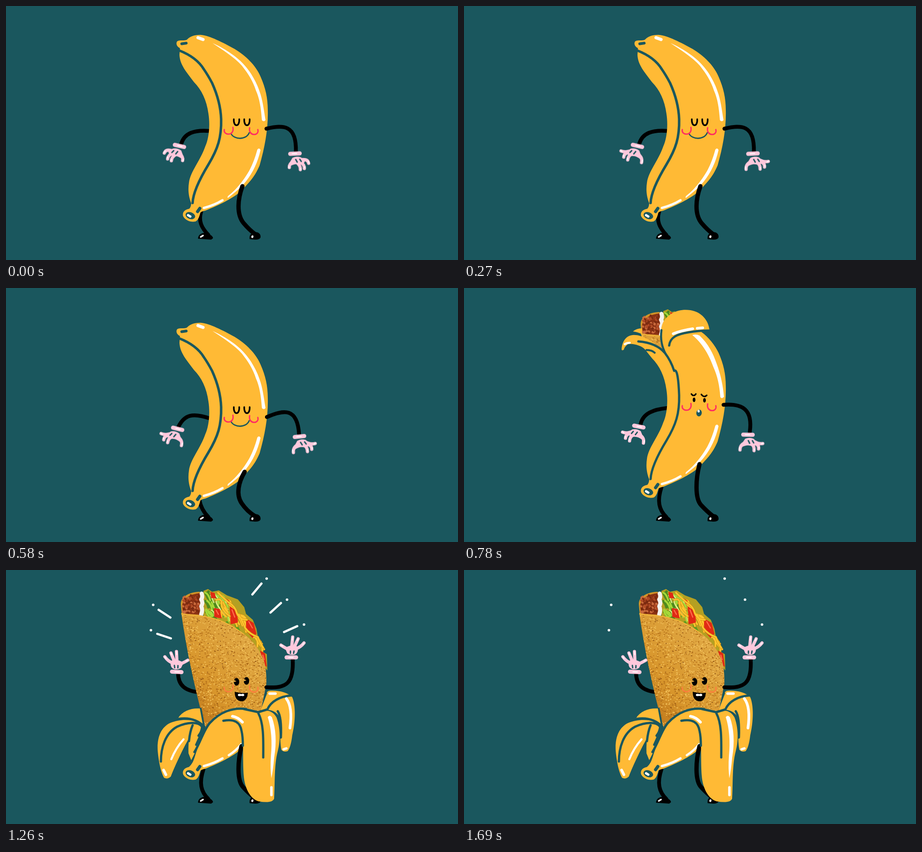
An HTML page for the animation above (1720 ms loop, 998 by 561 pixels).

```html
<!DOCTYPE html>
<html lang="en">
<head>
<meta charset="utf-8">
<title>Banana surprise</title>
<style>
  html, body { margin: 0; width: 100%; height: 100%; overflow: hidden; background: #1a575e; }
  svg { display: block; width: 100%; height: 100%; }
  svg path { stroke-linecap: round; stroke-linejoin: round; }
</style>
</head>
<body>
<svg id="stage" viewBox="0 0 998 561"></svg>
<script>
const LOOP = 1720;
const BG = '#1a575e', PEEL = '#ffba35', PINK = '#ffc8dc', RED = '#ff2d62', INK = '#000', WHITE = '#fff';

const fill = (d, c) => `<path d="${d}" fill="${c}"/>`;
const line = (d, w, c = INK) => `<path d="${d}" fill="none" stroke="${c}" stroke-width="${w}"/>`;
const oval = (x, y, rx, ry, c, r = 0) =>
  `<ellipse rx="${rx}" ry="${ry}" fill="${c}" transform="translate(${x} ${y}) rotate(${r})"/>`;
const group = (t, s) => `<g transform="${t}">${s}</g>`;
const use = (id, t = '') => `<use href="#${id}" transform="${t}"/>`;

let seed = 7;
const rnd = () => (seed = seed * 16807 % 2147483647) / 2147483647;
const many = (n, fn) => Array.from({ length: n }, (_, i) => fn(i / n)).join('');
const dots = (n, x, y, w, h) => many(n, () =>
  `M${(x + rnd() * w).toFixed(1)} ${(y + rnd() * h).toFixed(1)}h${(rnd() * 2).toFixed(1)}`);

// Hands: origin at the cuff, right-hand side; flip = -1 mirrors
const FINGERS = {
  curl: ['M-5 18Q-14 21 -14 30', 'M5 22Q11 28 10 36', 'M12 20Q20 26 19 34', 'M14 14Q28 13 29 23'],
  spread: ['M-6 18Q-17 22 -17 34', 'M9 21Q15 26 14 35', 'M14 18Q25 21 24 31', 'M12 14C22 19 24 20 33 19'],
  up: ['M-8 -18Q-17 -23 -23 -27', 'M1 -25L3 -45', 'M7 -24L15 -41', 'M10 -19Q20 -22 28 -32']
};
const TIPS = {
  curl: 'M-15 27v4M11 33v3M20 30v3M28 18l2 5',
  spread: 'M-18 28v6M15 31v4M25 27v3M30 20l4 -2',
  up: 'M-19 -25l-4 -2M2 -38l1 -7M13 -37l2 -4M25 -28l3 -4'
};
function hand([x, y, r], flip, kind) {
  const up = kind === 'up';
  const palm = up
    ? 'M-14 -21C-8 -25 8 -30 14 -23C16 -15 13 -8 7 -6Q-2 -4 -9 -9Z'
    : 'M-6 9Q4 5 13 9L21 18Q18 26 9 25Q-1 21 -12 27L-14 21Z';
  const marks = up ? 'M-2 -14v5M6 -14l-1 5' : 'M1 13l3 6M10 13l3 5';
  return group(`translate(${x} ${y}) rotate(${r}) scale(${flip} 1)`,
    fill(palm, PINK) + FINGERS[kind].map(d => line(d, 7, PINK)).join('') +
    line(marks, 3, BG) + line(TIPS[kind], 2, WHITE) +
    line('M-10.5 0H10.5', 9, PINK) + line('M-6 0H4', 2, WHITE));
}

// Limb poses
const POSE = {
  mid: {
    dy: 0,
    left: 'M450 276C415 273 394 281 387 304', lh: [383, 309, 13],
    right: 'M575 271C612 262 642 262 640 322', rh: [638, 326, -3],
    front: 'M522 398C512 425 508 460 525 480Q537 494 550 504', back: 'M431 454C424 475 432 490 447 506'
  },
  down: {
    dy: 13,
    left: 'M450 288C412 275 394 280 381 306', lh: [379, 311, 14],
    right: 'M576 285C615 268 643 265 647 322', rh: [648, 328, -6],
    front: 'M527 406C514 428 507 455 520 475Q532 493 550 504', back: 'M427 468C430 485 438 497 447 506'
  },
  up: {
    dy: -13,
    left: 'M449 265C420 268 395 276 390 301', lh: [386, 306, 11],
    right: 'M573 258C615 255 638 268 631 318', rh: [627, 324, 1],
    front: 'M520 389C512 420 509 465 524 480Q537 494 550 504', back: 'M436 440C426 470 430 490 447 506'
  }
};
const frontLeg = p => line(p.front, 9.5) +
  fill('M538 515C536 505 542 502 549 500C557 498 563 504 562 511Q561 516 550 516Z', INK) + oval(544, 509.5, 2.3, 3, WHITE, 10);
const backLeg = p => line(p.back, 8.5) +
  fill('M424 514C424 504 434 499 442 502Q457 506 457 513L453 516Z', INK) + line('M430 510L435 507', 3.5, WHITE);

// Faces, in resting coordinates
const cheeks = (c, w) => line('M482 273C479 286 505 288 501 268M538 269C534 288 560 288 556 273', w, c);
const FACE = {
  happy: line('M497 282C503 295 530 297 537 280', 2.8, BG) + cheeks(RED, 3) +
    line('M503 250C502 268 516 268 515 250M526 250C525 268 539 268 538 250', 3.5),
  angry: cheeks(RED, 3) + line('M502 247Q507 254 512 247M524 248Q530 256 536 250', 3.2) +
    oval(508, 260, 3, 5, INK) + oval(531, 261, 3, 5, INK) +
    oval(519, 289, 6, 7.5, BG, 10) + oval(518, 285, 2.5, 3, WHITE),
  grin: group('translate(0 -1)', cheeks('#ff7d3e', 2.5)) +
    oval(509, 260, 6, 8.5, INK) + oval(531, 258, 6, 8.5, INK) +
    fill('M509 259l-7 -4v6ZM531 257l-7 -4v6Z', '#dfa441') +
    fill('M505 282Q520 286 534 284C533 297 527 304 519 303C510 302 505 295 505 282Z', INK) +
    line('M514.5 289h2.5M521.5 289h2', 5, WHITE)
};

const STEM = 'C500 425 470 440 440 452Q430 454 429 457C427 465 424 474 418 476C408 478 396 474 391 464C389 456 394 450 404 448';
const stem = line('M423 454L428 447', 7, BG) + oval(407, 463, 11, 7.5, BG, 20) +
  line('M402 462L407 465', 5, WHITE) + line('M437 446Q460 440 478 429', 5, WHITE);
const shine = fill('M555 317Q559 312 562 318C556 345 545 368 530 387C520 400 505 412 490 424Q488 422 491 419C510 405 528 380 538 362Q548 343 555 317Z', WHITE);

const SIDE = 'C573 181 578 203 578 230C579 270 572 310 560 352C548 380 535 392 515 412' + STEM;
const LEFT = 'Q408 446 409 436C402 418 402 403 404 390C407 366 430 340 440 310C448 293 451 263 447 238C443 208 432 185 415 168';
const seam = ' 190 474 220 475 250C476 290 468 315 447 350C430 378 413 410 412 435';

const closed = fill('M378 78C384 74 394 78 400 74C406 67 418 63 432 64C450 66 478 80 505 95C530 110 552 132 562 156' +
  SIDE + LEFT + 'C398 145 384 130 383 108L384 93C376 89 375 82 378 78Z', PEEL) +
  line('M382 98C405 107 425 120 437 140Q446 153 455 170C464' + seam, 5.5, BG) +
  line('M388 83.5L398 82', 6, BG) + line('M424 70L435 74', 7, WHITE) +
  fill('M456 82C480 92 510 112 524 128C545 150 557 178 562 195C568 215 570 235 573 252Q569 257 565 252C563 225 560 205 552 187C545 165 535 150 521 132C505 114 480 98 456 82Z', WHITE) +
  shine + stem;

// The half-open shape is drawn in resting coordinates too
const halfOpen = fill('M373 109Q381 102 393 102V115Q383 110 373 109Z', PEEL) +
  fill('M348 149C349 133 356 119 372 117C390 115 415 128 443 153C436 133 430 108 440 88C452 68 475 58 500 62C525 66 540 85 542 106Q532 108 524 110C540 121 555 141 562 156' +
  SIDE + LEFT + 'L399 148C392 141 375 135 362 137Q354 143 353 149Q349 152 348 149Z', PEEL) +
  line('M385 131Q425 134 444 157Q457 174 464 196C471' + seam, 5, BG) +
  line('M436 106Q432 135 446 160M403 150Q415 150 421 156', 4.5, BG) +
  line('M453 140C455 122 470 115 495 111Q518 107 541 107', 5, BG) +
  line('M355 137Q360 134 366 134', 4.5, WHITE) +
  line('M462 114Q480 107 505 103M515 102L527 101', 6, WHITE) +
  fill('M504 117Q512 114 520 118C540 137 550 158 557 178C567 204 572 230 574 253Q570 259 566 254C564 228 560 208 550 186C542 163 526 134 504 117Z', WHITE) +
  shine + stem;

// Filled shell
const SHELL = 'M386 76L387 95C405 99 430 99 445 103C478 110 500 122 525 141C548 158 560 178 568 196C574 212 575 230 575 250L560 325L440 348Q403 210 387 95Z';
const crumbs = many(75, () =>
  oval((391 + rnd() * 36).toFixed(1), (56 + rnd() * 39).toFixed(1), 3, 2.2, ['#c96a3c', '#b04a24', '#7a2a10'][rnd() * 3 | 0], 40));
// Curls scattered along the arc of the filling, from u = a to b
const curls = (n, a, b) => many(n, i => {
  const u = a + (b - a) * i, x = 440 + u * 125, y = 48 + u * u * 115 + rnd() * 50 * (1 - u * .8);
  return `M${x | 0} ${y | 0}q${rnd() * 16 - 4 | 0} ${rnd() * 8 | 0} ${4 + rnd() * 10 | 0} ${8 + rnd() * 14 | 0}`;
});
const cheese = d => line(d, 5, '#c88a12') + line(d, 3.4, '#ffc62e');
const taco = fill('M436 46L446 42L455 48L470 45L488 56L512 65L526 82L530 97L545 110L553 130L558 158L567 165L566 180L576 186L577 222L560 200L522 142L508 132L488 136L480 118L436 104Z', '#b4a022') +
  line(curls(26, 0, .3), 6, '#4f8a1c') + line(curls(30, 0, .5), 4, '#a6d838') +
  line('M488 116l4 16M508 122l6 12', 6, '#5c9a20') + line(curls(16, .1, .4), 2.5, '#e2f08a') +
  cheese(curls(34, .25, 1)) +
  fill('M451 48l10 3l3 12l-11 -1ZM459 84l13 2l4 21l-16 -3ZM494 80l17 12l1 24l-16 4ZM480 60l14 8l-4 8ZM530 107l17 10l6 24l-9 9l-14 -16ZM561 178l11 6l4 30l-8 -5Z', '#e02a14') +
  line('M536 114l8 14M499 88l6 16M464 89l5 9M567 188l3 10', 2.5, '#ff6c4b') +
  cheese('M464 66q14 -6 12 14q4 12 18 22M468 50q14 14 24 22q14 8 18 24q6 14 22 14M514 98q10 20 14 30q10 14 28 20q4 12 12 24') +
  fill('M386 76C385 60 402 49 428 48L432 102L388 98Z', '#d19428') +
  fill('M389 80C389 65 404 53 429 51L430 99L391 96Z', '#8a3113') + crumbs +
  line('M432 52q3 8 -1 13q5 8 0 15q4 8 0 18', 9, '#f6f3ee') +
  fill(SHELL, 'url(#crust)') +
  '<g clip-path="url(#shell)">' + line(dots(1100, 386, 95, 192, 255), 1.9, '#b8741c') +
  line(dots(900, 386, 95, 192, 255), 1.8, '#f3c25c') + line(dots(170, 400, 105, 176, 240), 1.6, '#84480f') + '</g>' +
  line('M388 97C405 101 430 100 445 104C478 111 500 123 525 142', 2.5, '#f0b23a');

// Peeled skin
const leftPeel = fill('M380 327C390 311 410 304 430 306L438 345Q410 322 380 327Z', PEEL) +
  line('M430 306L437 344', 4, BG) +
  fill('M412 340C404 362 402 385 403 405L409 420L420 398L438 346L420 335Z', PEEL) +
  fill('M438 345C420 328 385 328 362 338C342 348 333 370 335 400C338 430 343 448 349 459Q357 463 364 456C370 440 390 395 405 370L416 340Z', PEEL) +
  line('M342 423C342 392 352 360 378 346C400 336 424 334 433 346Q432 358 425 366M412 343Q406 357 404 378M380 329Q415 323 438 346L420 386', 5, BG) +
  line('M392 374Q375 393 365 418', 4.5, WHITE) + line('M348 442L353 452', 6, WHITE);
const rightPeel = fill('M558 312C565 290 570 272 580 267C600 265 622 270 632 281C640 300 639 335 632 365Q629 391 622 400Q613 403 608 397C604 375 606 345 604 325Q596 311 580 309Z', PEEL) +
  line('M560 308L574 272M577 308C585 290 605 279 630 277M600 312Q609 325 607 370', 5, BG) +
  line('M582 273H595M613 396L619 394', 5.5, WHITE) + line('M619 284C631 300 630 328 627 349', 6, WHITE);
const base = fill('M404 435C416 425 416 410 425 390C435 370 440 350 455 335C475 315 500 305 530 308L560 318L545 365L515 399' +
  STEM.replace(/(\d+) (\d+)/g, (_, x, y) => `${x} ${y - 13}`) + 'Z', PEEL) +
  line('M416 402C430 380 436 354 450 338C472 314 500 303 530 307', 5, BG) +
  use('stem', 'translate(0 -13)') + line('M519 385Q508 399 492 409', 5, WHITE);
const frontPeel = fill('M500 320L525 308L560 314C575 306 590 312 597 325C605 345 607 375 600 400C592 430 594 470 592 505Q588 516 558 511C538 505 527 480 525 455C523 430 524 400 523 383Q522 340 500 330Z', PEEL) +
  line('M480 333C505 328 517 337 520 355Q523 368 523 388M557 316C570 340 568 380 568 414M525 307L557 314Q567 311 577 308', 5, BG) +
  fill('M578 325Q582 319 587 325C596 350 598 380 592 415Q590 440 586 460Q583 440 585 410C588 380 586 350 578 325Z', WHITE) +
  line('M586 480V497', 5.5, WHITE) + line('M500 323Q512 325 522 336', 6, WHITE);

// Whole figures
const dance = (pose, kind, face = 'happy') => {
  const p = POSE[pose];
  return line(p.left, 8.5) + backLeg(p) + group(`translate(0 ${p.dy})`, use('closed') + FACE[face]) +
    line(p.right, 8.5) + frontLeg(p) + hand(p.lh, -1, kind) + hand(p.rh, 1, kind);
};
const peek = () => {
  const p = POSE.up;
  return line(p.left, 8.5) + backLeg(p) + `<g clip-path="url(#peek)">${use('taco', 'translate(4 5)')}</g>` +
    group('translate(0 -13)', halfOpen + FACE.angry) +
    line(p.right, 8.5) + frontLeg(p) + hand(p.lh, -1, 'spread') + hand(p.rh, 1, 'spread');
};
const reveal = (fling, wave) => {
  const p = POSE.up;
  return line('M428 270C397 268 380 255 380 228', 8.5) + backLeg(p) +
    group(`rotate(${-fling * .4} 575 300)`, rightPeel) + use('taco') +
    group('translate(0 -13)', FACE.grin) +
    line('M575 259C620 262 636 250 633 196', 8.5) +
    group(`rotate(${fling * .58} 435 340)`, leftPeel) + base + frontLeg(p) +
    group(`rotate(${-fling} 565 315)`, frontPeel) +
    hand([377, 225, 3 - wave], -1, 'up') + hand([630, 193, wave], 1, 'up');
};

const SCENES = [
  [0, dance('mid', 'curl')], [100, dance('down', 'spread')], [170, dance('up', 'curl')],
  [270, dance('mid', 'spread')], [340, dance('down', 'curl')], [410, dance('up', 'spread')],
  [510, dance('mid', 'curl')], [580, dance('down', 'spread')], [650, dance('up', 'curl')],
  [720, dance('up', 'spread', 'angry')], [780, peek()], [880, reveal(43, 8)],
  [980, reveal(0, 0)], [1050, reveal(0, 6)], [1120, reveal(0, 0)]
];

// Sparks: inner end, outer end, dot
const SPARKS = [
  [544, 54, 564, 30, 575.5, 19], [584, 94, 607, 73, 620.5, 65.5], [614, 137, 643, 124, 658, 120.5],
  [363, 105, 337, 88, 325, 77], [364, 151, 334, 141, 320, 133]
];
const sparks = SPARKS.map(([a, b, c, d, x, y]) =>
  `<path class="ray" pathLength="100" stroke-dasharray="100 300" d="M${a} ${b}L${c} ${d}" stroke="#fff" stroke-width="5"/>` +
  `<circle class="dot" cx="${x}" cy="${y}" r="2.8" fill="#fff"/>`).join('');

const stage = document.getElementById('stage');
stage.innerHTML = `<defs>
  <linearGradient id="crust" x1=".1" y1="1" x2=".75" y2=".2"><stop offset="0" stop-color="#b87018"/>
    <stop offset=".4" stop-color="#d8962c"/><stop offset="1" stop-color="#e0a844"/></linearGradient>
  <clipPath id="shell"><path d="${SHELL}"/></clipPath>
  <clipPath id="peek"><path d="M380 40H466V62L452 150L392 120Z"/></clipPath>
  <g id="taco">${taco}</g><g id="closed">${closed}</g><g id="stem">${stem}</g></defs>
  <rect width="998" height="561" fill="${BG}"/>` +
  SCENES.map(s => `<g class="scene">${s[1]}</g>`).join('') + sparks;

// Hold each value until the next listed time
function steps(el, prop, table) {
  const last = table[table.length - 1][1];
  el.animate([...table, [LOOP, last]].map(([t, v]) => ({ offset: t / LOOP, [prop]: v, easing: 'step-end' })),
    { duration: LOOP, iterations: Infinity });
}
const show = (el, on, off) => steps(el, 'opacity',
  [...(on ? [[0, 0]] : []), [on, 1], ...(off < LOOP ? [[off, 0]] : [])]);

stage.querySelectorAll('.scene').forEach((el, i) =>
  show(el, SCENES[i][0], i + 1 < SCENES.length ? SCENES[i + 1][0] : LOOP));

const SHRINK = [1290, 1360, 1390, 1460, 1490, 1560, 1590, 1650];
stage.querySelectorAll('.ray').forEach(el => {
  show(el, 1190, 1690);
  steps(el, 'strokeDashoffset', [[0, 60], [1260, 0], ...SHRINK.map((t, i) => [t, -11.5 * (i + 1)])]);
});
stage.querySelectorAll('.dot').forEach(el => show(el, 1260, LOOP));
</script>
</body>
</html>
```
